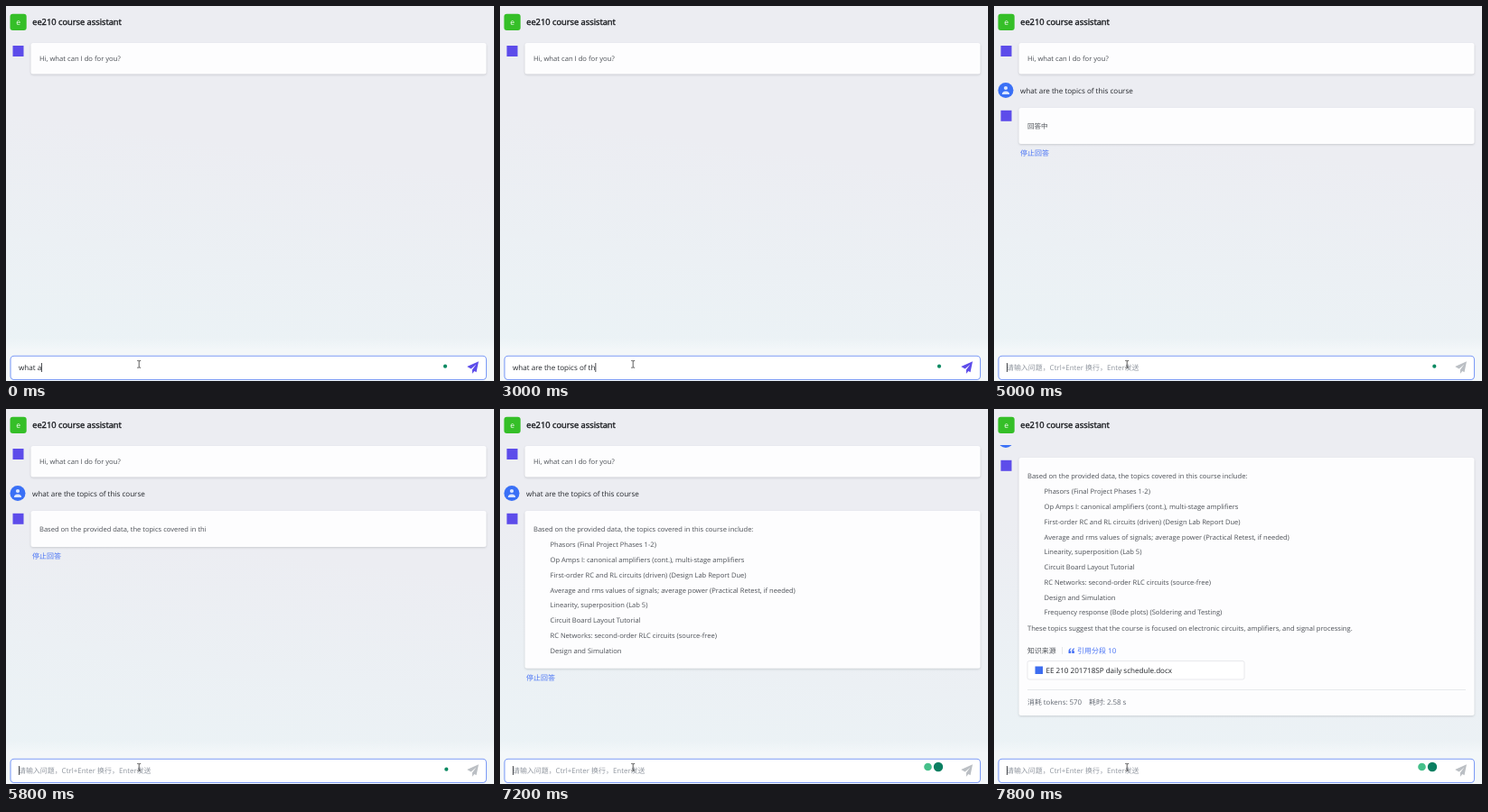
Write an HTML page that moves like this. It is 540 px wide and 416 px high and loops after 8 s.

```html
<!DOCTYPE html>
<html lang="en">
<head>
<meta charset="utf-8">
<title>Course assistant chat</title>
<style>
html, body { margin: 0; width: 100%; height: 100%; overflow: hidden; }
body { background: linear-gradient(187.6deg, #ecedf2 39%, #ebf3f6 94%); }
svg { display: block; width: 540px; height: 416px; }
text {
  font-family: 'Open Sans', 'Noto Sans CJK SC', 'Noto Sans CJK', sans-serif;
  text-rendering: geometricPrecision;
  white-space: pre;
}
.card { fill: #fdfdfe; filter: drop-shadow(0 1px 1px rgba(31, 35, 41, .17)); }
</style>
</head>
<body>
<svg id="stage" viewBox="0 0 540 416"></svg>
<script>
const LOOP = 8000, SIZE = 8.08, BODY = 7.55;
const INK = '#23262b', SOFT = '#4c5056', BLUE = '#4a74f5', BOT = '#5d4cea';
const stage = document.getElementById('stage');
const pen = document.createElement('canvas').getContext('2d');
pen.font = "100px 'Open Sans', sans-serif";

const question = 'what are the topics of this course';
// Moments at which the characters after "what a" arrive
const keys = [100, 200, 200, 400, 500, 600, 600, 700, 900, 1000, 1200, 1300, 1400, 1600,
  2500, 2600, 2800, 2900, 3000, 3200, 3600, 3800, 3900, 4000, 4100, 4300, 4500, 4600];
const answer = [
  'Based on the provided data, the topics covered in this course include:',
  'Phasors (Final Project Phases 1-2)',
  'Op Amps I: canonical amplifiers (cont.), multi-stage amplifiers',
  'First-order RC and RL circuits (driven) (Design Lab Report Due)',
  'Average and rms values of signals; average power (Practical Retest, if needed)',
  'Linearity, superposition (Lab 5)',
  'Circuit Board Layout Tutorial',
  'RC Networks: second-order RLC circuits (source-free)',
  'Design and Simulation',
  'Frequency response (Bode plots) (Soldering and Testing)',
  'These topics suggest that the course is focused on electronic circuits, amplifiers, and signal processing.'
];
// Streamed characters over time: [ms, count]
const stream = [[5600, 4], [5800, 53], [6500, 232], [7200, 442], [7700, 610]];

const text = (x, y, s, size = SIZE, fill = INK, extra = '') =>
  `<text x="${x}" y="${y}" font-size="${size}" fill="${fill}" ${extra}>${s}</text>`;
const rect = (x, y, w, h, fill, extra = '') =>
  `<rect x="${x}" y="${y}" width="${w}" height="${h}" fill="${fill}" ${extra}/>`;
const dot = (x, y, r, fill) => `<circle cx="${x}" cy="${y}" r="${r}" fill="${fill}"/>`;
const card = (top, bottom) =>
  `<rect class="card" x="27.5" y="${top}" width="504" height="${bottom - top}" rx="2.5"/>`;
const bot = y => rect(7.5, y - 6, 12, 12, BOT);

function streamed(t) {
  for (let i = 1; i < stream.length; i++) {
    const [t0, n0] = stream[i - 1], [t1, n1] = stream[i];
    if (t <= t1) return Math.round(n0 + (n1 - n0) * (t - t0) / (t1 - t0));
  }
  return 1e4;
}

const lineY = i => i === 0 ? 133 : i === 10 ? 302 : 150.5 + (i - 1) * 16.75;

function reply(t) {
  let body = '', last = 0;
  if (t < 5600) {
    body = text(37, 136, '回答中', BODY, SOFT);
    const dots = t < 5100 ? 0 : t < 5200 ? 1 : t < 5400 ? 2 : 3;
    for (let i = 0; i < dots; i++) body += rect(60.4 + i * 2.5, 129.3, 1.5, 1.5, SOFT);
  } else {
    let left = streamed(t);
    answer.forEach((line, i) => {
      if (left <= 0) return;
      body += text(i % 10 ? 55.5 : 37, lineY(i) + 2.9, line.slice(0, left), BODY, SOFT);
      left -= line.length;
      last = i;
    });
  }
  const done = t >= 7800, bottom = done ? 399 : lineY(last) + 20;
  return bot(121.8) + card(113, bottom) + body +
    (done ? sources() : text(29, bottom + 13.4, '停止回答', 8, BLUE));
}

function sources() {
  const quote = x => `<path d="M${x + 2.8} 324.3q-2.8 .8-2.8 3.5v2.2h2.7v-2.7h-1.3q.1-1.4 1.4-2z" fill="${BLUE}"/>`;
  return text(37, 330.2, '知识来源', 7.9, SOFT) +
    rect(75.3, 323, .6, 8, '#d5d8dc') + quote(82.5) + quote(86.2) +
    text(92, 330, '引用分段 10', 8, BLUE) +
    rect(37, 338.5, 240, 20.5, '#fff', 'rx="2" stroke="#e2e4e8" stroke-width=".8"') +
    rect(45.5, 344.5, 8.5, 8.5, '#3d6df0') +
    text(57.5, 352, 'EE 210 201718SP daily schedule.docx') +
    rect(37, 370.2, 485, .7, '#dfe1e5') +
    text(37, 386.8, '消耗 tokens: 570', 7.9, '#646a73') +
    text(105, 386.8, '耗时: 2.58 s', 7.9, '#646a73');
}

function chat(t) {
  let s = bot(50) + card(41, 75.5) + text(37, 60.9, 'Hi, what can I do for you?', 7.65, SOFT);
  if (t >= 5000) {
    s += dot(13, 93.5, 8.5, '#3a70f6') + dot(13, 91, 2.1, '#dbe6ff') +
      '<path d="M8.9 98q0-3.6 4.1-3.6t4.1 3.6z" fill="#dbe6ff"/>' +
      text(29, 97, question) + reply(t);
  }
  return `<g clip-path="url(#view)"><g transform="translate(0 ${t >= 7800 ? -59 : 0})">${s}</g></g>`;
}

function inputBar(t) {
  const sent = t >= 4800;
  const typed = sent ? '' : question.slice(0, 6 + keys.filter(k => k <= t).length);
  const caretX = 14 + pen.measureText(typed).width * SIZE / 100;
  const caretOn = sent ? (t - 4750) % 1000 < 500 : t < 2100 || t >= 2500;
  let s = rect(0, 368, 540, 14, 'url(#fade)') + rect(0, 382, 540, 34, '#f3f7f9') +
    rect(5, 388.3, 526.5, 26.2, '#fff', 'rx="4" stroke="#7f9df6" stroke-width="1.1"') +
    (sent ? text(14, 404, '请输入问题，Ctrl+Enter 换行，Enter发送', 7.95, '#8f959e') : text(14, 403.9, typed));
  if (caretOn) s += rect(caretX, 396, .8, 10, INK);
  s += t >= 6500
    ? dot(473.5, 397, 4.3, '#45c08a') + dot(485, 397, 5.2, '#0b7f61')
    : dot(sent && t >= 5000 ? 487.3 : 486, 399.7, 2.1, '#0c8a62');
  s += `<path d="M523 394.3l-12.8 5.8 4.4 2.4 5.6-4.8-4.3 5.7v4.6l2.3-3 2.3 1.2z" fill="${sent ? '#bbbfc4' : BOT}"/>`;
  return s + '<path d="M145.2 393.4h1.4l.6.5.6-.5h1.4M147.2 393.8v7M145.2 401.2h1.4l.6-.5.6.5h1.4" fill="none" stroke="#333" stroke-width=".8"/>';
}

const defs = `<defs>
  <clipPath id="view"><rect y="40" width="540" height="342"/></clipPath>
  <linearGradient id="fade" x2="0" y2="1"><stop stop-color="#f3f7f9" stop-opacity="0"/><stop offset="1" stop-color="#f3f7f9"/></linearGradient>
</defs>`;
const header = rect(4.5, 8.7, 18.2, 18.2, '#35bf28', 'rx="3"') +
  text(13.6, 20.7, 'e', 8.5, '#fff', 'text-anchor="middle"') +
  text(29.2, 21, 'ee210 course assistant', 9.3, '#16181c', 'stroke="#16181c" stroke-width=".35"');

let shown = -1;
function tick() {
  const t = Math.floor(performance.now() % LOOP / 100) * 100;
  if (t !== shown) {
    stage.innerHTML = defs + header + chat(t) + inputBar(t);
    shown = t;
  }
  requestAnimationFrame(tick);
}
tick();
</script>
</body>
</html>
```
